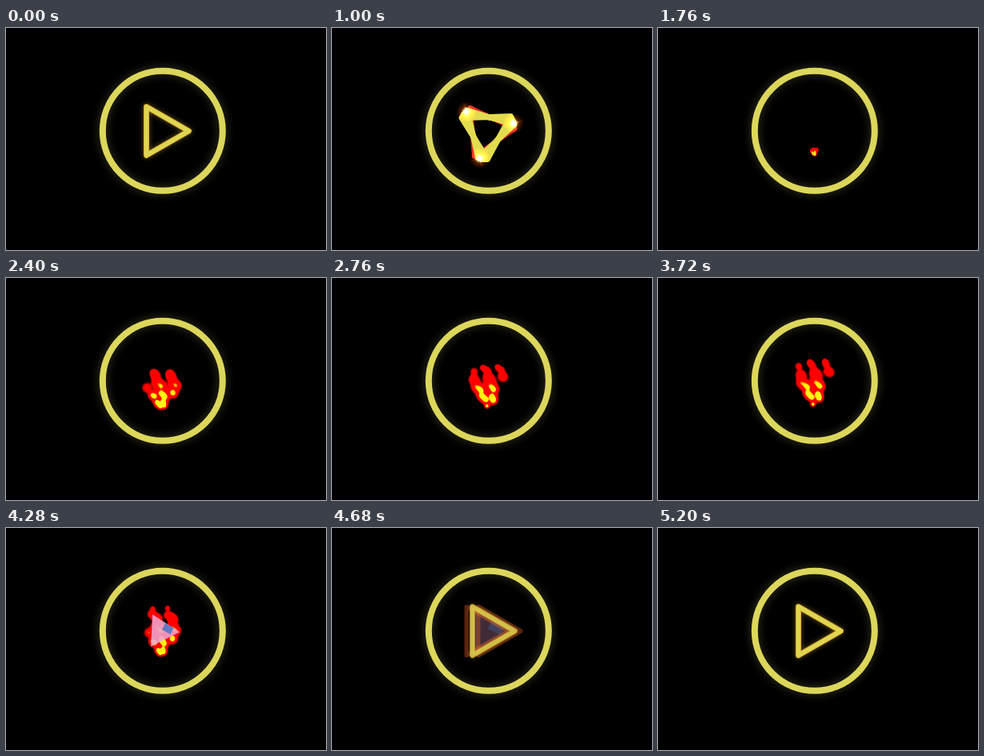
Recreate the animation shown at these times as an HTML page with a canvas. Size 400 px wide and 278 px high, loop 5760 ms.

```html
<!DOCTYPE html>
<html lang="en">
<head>
<meta charset="utf-8">
<title>Burning play button</title>
<style>
html, body { margin: 0; width: 100%; height: 100%; overflow: hidden; background: #000; }
canvas { display: block; }
</style>
</head>
<body>
<canvas id="stage" width="400" height="278"></canvas>
<script>
const LOOP = 5760, STEP = 40;
const EMBERS = 32, LIFE = 960;
const FIRE = { x: 149, y: 84, size: 92 };

const ctx = document.getElementById('stage').getContext('2d');
const fire = document.createElement('canvas');
fire.width = fire.height = FIRE.size;
const fireCtx = fire.getContext('2d');

const clamp = v => Math.min(1, Math.max(0, v));
const ramp = (t, a, b) => clamp((t - a) / (b - a));
const smooth = v => v * v * (3 - 2 * v);
const mix = (a, b, k) => a + (b - a) * k;

// Embers rise from a narrow base, spread out and cool from yellow to red
function ember(i, t) {
  const age = (i * 0.7549 + t / LIFE) % 1;
  const side = (i * 0.618) % 1 * 2 - 1;
  const size = t < 1760 ? 0.2 * ramp(t, 1520, 1760) : mix(0.2, 1, smooth(ramp(t, 1760, 2400)));
  const tall = ramp(t, 2400, 4280);
  const spread = 4 + 15 * Math.min(1, age * 2);
  const sway = 2 * Math.sin(t / 130 + i * 1.7) * age;
  return {
    x: 195 + (side * spread + sway) * size,
    y: mix(159, 161 - 4 * tall, size) - mix(48, 58, tall) * age * size,
    r: Math.max(0.01, 4.6 * Math.sqrt(Math.sin(Math.PI * (0.12 + 0.8 * age))) *
      mix(0.1, 1, size) * (1 - ramp(t, 4280, 4680))),
    heat: clamp(1.3 - 1.7 * age)
  };
}

function drawFire(t) {
  const embers = Array.from({ length: EMBERS }, (_, i) => ember(i, t));
  const image = fireCtx.createImageData(FIRE.size, FIRE.size);
  for (let y = 0, p = 0; y < FIRE.size; y++) {
    for (let x = 0; x < FIRE.size; x++, p += 4) {
      let body = 0, heat = 0;
      for (const e of embers) {
        const d = ((x + FIRE.x - e.x) ** 2 + (y + FIRE.y - e.y) ** 2) / (e.r * e.r);
        if (d > 9) continue;
        body += Math.exp(-0.7 * d);
        heat += e.heat * Math.exp(-1.6 * d);
      }
      image.data[p] = 255;
      image.data[p + 1] = 245 * smooth(ramp(heat, 0.35, 0.8));
      image.data[p + 2] = 20 * ramp(heat, 0.6, 1.2);
      image.data[p + 3] = 255 * smooth(ramp(body, 0.08, 0.65));
    }
  }
  fireCtx.putImageData(image, 0, 0);
  ctx.drawImage(fire, FIRE.x, FIRE.y);
}

const corners = [[-18, -30.5], [35, 0], [-18, 30.5]];

function place(x, y, angle, scale, draw) {
  ctx.save();
  ctx.translate(x, y);
  ctx.rotate(angle * Math.PI / 180);
  ctx.scale(scale, scale);
  ctx.beginPath();
  corners.forEach(c => ctx.lineTo(...c));
  ctx.closePath();
  draw();
  ctx.restore();
}

function line(color, width) {
  ctx.strokeStyle = color;
  ctx.lineWidth = width;
  ctx.stroke();
}

function outline() {
  ctx.shadowColor = 'rgba(230,190,60,.45)';
  ctx.shadowBlur = 6;
  line('#dca936', 7);
  ctx.shadowBlur = 0;
  line('#dfd651', 5);
}

function drawRing() {
  ctx.save();
  ctx.shadowColor = 'rgba(225,215,140,.28)';
  ctx.shadowBlur = 12;
  ctx.beginPath();
  ctx.arc(195.8, 128.8, 75, 0, Math.PI * 2);
  line('#dcd75b', 8);
  ctx.restore();
}

function sparkle(x, y) {
  const glow = ctx.createRadialGradient(x, y, 0, x, y, 13);
  glow.addColorStop(0, '#fff');
  glow.addColorStop(0.2, '#ffe09a');
  glow.addColorStop(0.5, 'rgba(255,110,10,.3)');
  glow.addColorStop(1, 'rgba(255,60,0,0)');
  ctx.fillStyle = glow;
  ctx.fillRect(x - 13, y - 13, 26, 26);
  ctx.fillRect(x - 0.5, y - 13, 1, 26);
  ctx.fillRect(x - 13, y - 0.5, 26, 1);
}

function burnAway(t) {
  const start = ramp(t, 600, 1000), shrink = smooth(ramp(t, 1120, 1680));
  const scale = 1 - shrink;
  const turn = -32 * start * start - 55 * ramp(t, 1000, 1680);
  const x = mix(193.5, 194, shrink), y = mix(129, 155, shrink);
  if (start === 0) return place(x, y, 0, 1, outline);

  // Overlapping turned copies make the smeared band
  place(x, y, turn * 0.15, scale, () => line('#e52b2b', 6));
  for (let k = 0.4; k <= 1.01; k += 0.1) {
    place(x, y, turn * k, scale, () => line(t > 1300 ? '#ffc52e' : '#e3dc4e', 7));
  }
  ctx.globalCompositeOperation = 'lighter';
  ctx.globalAlpha = start * scale;
  for (const corner of corners) {
    place(x, y, turn * 0.5, scale, () => sparkle(...corner));
  }
  ctx.globalAlpha = 1;
  ctx.globalCompositeOperation = 'source-over';
}

function reform(t) {
  const settle = smooth(ramp(t, 4280, 4640)), yellow = ramp(t, 4400, 4800);
  const scale = mix(0.66 * ramp(t, 4160, 4280), 1, settle);
  const x = mix(194, 193.5, settle), angle = 3 * (1 - settle);
  const smear = Math.sin(Math.PI * ramp(t, 4440, 5200));

  ctx.globalAlpha = 0.88 * (1 - yellow);
  place(x, 129, angle, scale, () => {
    ctx.fillStyle = '#f0a5d2';
    ctx.fill();
    ctx.clip();
    ctx.rotate(0.45);
    ctx.fillStyle = '#4b78c4';
    ctx.fillRect(0, -17, 18, 14);
  });

  ctx.globalAlpha = smear * 0.45;
  for (const shift of [-9, 9]) {
    place(x + shift * smear, 129, 0, scale, () => line('#e9552a', 5));
  }
  ctx.globalAlpha = yellow;
  place(x, 129, angle, scale, outline);
  ctx.globalAlpha = 1;
}

function draw(t) {
  ctx.fillStyle = '#000';
  ctx.fillRect(0, 0, 400, 278);
  ctx.lineJoin = 'round';
  drawRing();
  if (t < 1680) burnAway(t);
  if (t > 1520 && t < 4680) drawFire(t);
  if (t > 4160) reform(t);
}

let shown = -1;
function tick() {
  const t = Math.floor(performance.now() % LOOP / STEP) * STEP;
  if (t !== shown) draw(shown = t);
  requestAnimationFrame(tick);
}
tick();
</script>
</body>
</html>
```
